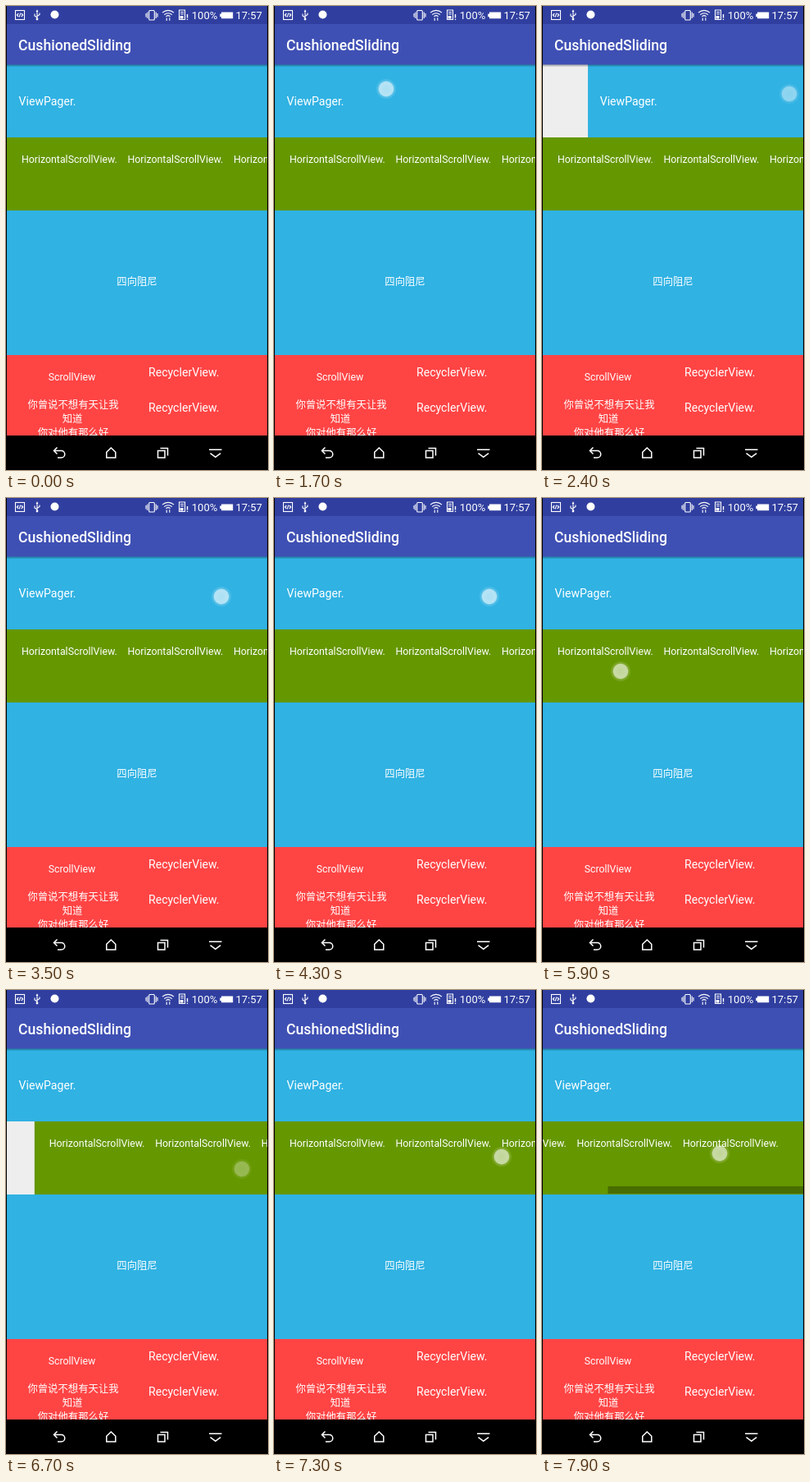
These frames come from a looping animation (320 px wide and 565 px high, 8000 ms). An HTML page:

```html
<!DOCTYPE html>
<html lang="zh">
<head>
<meta charset="utf-8">
<title>CushionedSliding</title>
<style>
  html, body { margin: 0; width: 100%; height: 100%; overflow: hidden; background: #000; }
  #stage { display: block; width: 100%; height: 100%; }
  text { fill: #fff; font: 12.36px Roboto, "Noto Sans CJK SC", "Noto Sans CJK", sans-serif; }
  .title { font-size: 17.66px; font-weight: 500; }
  .big { font-size: 14.1px; }
  .bar { font-size: 13px; }
  .mid { text-anchor: middle; }
  .line { fill: none; stroke: #fff; stroke-width: 1.5; }
  .thin { fill: none; stroke: #fff; stroke-width: 1.1; }
  .solid { fill: #fff; }
</style>
</head>
<body>
<svg id="stage" viewBox="0 0 320 565">
  <defs>
    <linearGradient id="shade" x2="0" y2="1">
      <stop offset="0" stop-color="#000" stop-opacity=".32"/>
      <stop offset="1" stop-color="#000" stop-opacity="0"/>
    </linearGradient>
    <radialGradient id="glow">
      <stop offset="0" stop-color="#fff" stop-opacity=".6"/>
      <stop offset=".7" stop-color="#fff" stop-opacity=".64"/>
      <stop offset=".8" stop-color="#fff" stop-opacity=".18"/>
      <stop offset="1" stop-color="#fff" stop-opacity=".07"/>
    </radialGradient>
  </defs>

  <rect width="320" height="565"/>
  <rect x="1" y="71" width="318" height="452" fill="#eee"/>

  <svg x="1" y="71" width="318" height="89">
    <g id="pager"><rect width="954" height="89" fill="#30b2e3"/></g>
  </svg>

  <svg x="1" y="160" width="318" height="89">
    <g id="row"><rect width="424" height="89" fill="#659700"/></g>
    <rect id="thumb" y="79" width="239" height="9" fill="#000" fill-opacity=".28"/>
  </svg>

  <rect x="1" y="249" width="318" height="176" fill="#30b2e3"/>
  <text class="mid" x="160" y="340">四向阻尼</text>

  <svg x="1" y="425" width="318" height="98">
    <rect width="318" height="98" fill="#ff4444"/>
    <g class="mid">
      <text x="79.5" y="30.5">ScrollView</text>
      <text x="81" y="65">你曾说不想有天让我</text>
      <text x="80" y="82">知道</text>
      <text x="81" y="99">你对他有那么好</text>
    </g>
    <text class="big" x="173" y="26">RecyclerView.</text>
    <text class="big" x="173" y="68.5">RecyclerView.</text>
  </svg>

  <rect x="1" y="22" width="318" height="49.5" fill="#3f50b4"/>
  <rect x="1" y="71.5" width="318" height="3" fill="url(#shade)"/>
  <rect x="1" width="318" height="22" fill="#303f9f"/>
  <text class="title" x="15" y="53.5">CushionedSliding</text>

  <!-- status icons -->
  <g class="thin">
    <rect x="11.5" y="5.5" width="11" height="11"/>
    <path d="M15.3 9l-2 2 2 2M18.7 9l2 2-2 2M17.7 8.7l-1.4 4.6"/>
    <path d="M38 6v10M38 14l-3-2V9.5M38 12.5l3-2V8.5"/>
    <rect x="174.7" y="5.5" width="6.6" height="11.5" rx="1"/>
    <path d="M172.8 7.5v7.5M183.2 7.5v7.5M171 9v4.5M185 9v4.5"/>
    <path d="M191 8.2a10 10 0 0 1 14 0M193.2 10.6a7 7 0 0 1 9.6 0M195.4 12.8a4 4 0 0 1 5.2 0"/>
    <path d="M196.2 14.5v3.5M199.8 14.3v3.5"/>
    <path d="M211.5 5h7v11.5h-7zM213 7.5h4M213 9.8h4"/>
  </g>
  <g class="solid">
    <circle cx="59.5" cy="10.5" r="5"/>
    <path d="M36.5 7L38 4.2 39.5 7z"/>
    <circle cx="38" cy="16" r="1.4"/>
    <rect x="212.5" y="12" width="4" height="3.5"/>
    <path d="M220.8 10h1.4v4.5h-1.4zM220.8 15.7h1.4v1.4h-1.4z"/>
    <path d="M261.3 9.5h1.7V7.5h14.2v7.8H263v-2h-1.7z"/>
  </g>
  <text class="bar" x="226.8" y="16">100%</text>
  <text class="bar" x="280.5" y="16">17:57</text>

  <!-- navigation icons -->
  <g class="line">
    <path d="M62.5 537.5l-4 4 4 4M58.8 541.5h8.7a4.3 4.3 0 0 1 0 8.6h-4.5"/>
    <path d="M122.8 543.3l5.5-5.3 5.5 5.3v6.7h-11z"/>
    <path d="M185.5 541.5h8.5v8.5h-8.5zM188.5 538.6h9v9"/>
    <path d="M248 540.2h15.5M249.5 544.6l6.3 4.8 6.3-4.8"/>
  </g>

  <g id="finger">
    <circle r="12.3" fill="url(#glow)"/>
    <circle r="6" fill="none" stroke="#fff" stroke-opacity=".2" stroke-dasharray="1 1.5"/>
  </g>
</svg>
<script>
const LOOP = 8000, STEP = 100, PAGE = 318, ROW_MAX = 106, DAMPING = 0.51;
const $ = id => document.getElementById(id);

// Without a scroll distance, a swipe stretches the panel past its edge.
const swipes = [
  { panel: "pager", at: 1700, hold: 500, x: 137, y: 101, dx: 165 },
  { panel: "pager", at: 3500, hold: 200, x: 263, y: 120, dx: -150, scroll: PAGE },
  { panel: "pager", at: 4300, hold: 150, x: 263, y: 120, dx: -150, scroll: PAGE },
  { panel: "pager", at: 4700, hold: 250, x: 263, y: 120, dx: -150 },
  { panel: "row", at: 5900, hold: 500, x: 96, y: 211, dx: 192 },
  { panel: "row", at: 7300, hold: 200, x: 278, y: 203, dx: -150, scroll: ROW_MAX },
  { panel: "row", at: 7900, hold: 500, x: 217, y: 199, dx: -150 }
];

const clamp = p => Math.min(1, Math.max(0, p));
const ramp = (t, from, length) => (1 - Math.cos(Math.PI * clamp((t - from) / length))) / 2;

const drag = (s, t) => s.dx * ramp(t, s.at, s.hold * 0.8);

function shift(s, t) {
  if (s.scroll) return -s.scroll * ramp(t, s.at, s.hold * 2);
  return DAMPING * drag(s, t) * (1 - ramp(t, s.at + s.hold, s.hold));
}

const offset = (panel, t) =>
  swipes.filter(s => s.panel === panel).reduce((sum, s) => sum + shift(s, t), 0);

function addLabel(parent, text, x, y, cls) {
  const el = document.createElementNS("http://www.w3.org/2000/svg", "text");
  el.setAttribute("x", x);
  el.setAttribute("y", y);
  if (cls) el.setAttribute("class", cls);
  el.textContent = text;
  parent.append(el);
}

for (let i = 0; i < 3; i++) {
  addLabel($("pager"), "ViewPager.", 14.6 + i * PAGE, 50, "big");
  addLabel($("row"), "HorizontalScrollView.", 17.9 + i * 129.5, 31);
}

const move = (id, x, y = 0) => $(id).setAttribute("transform", `translate(${x} ${y})`);
const fade = (id, alpha) => $(id).setAttribute("opacity", alpha);

function draw(now) {
  const t = Math.floor(now % LOOP / STEP) * STEP;
  const row = offset("row", t);
  move("pager", offset("pager", t));
  move("row", row);
  move("thumb", -row * PAGE / (PAGE + ROW_MAX));
  fade("thumb", row < 0 ? 1 : 0);

  const s = swipes.find(s => t >= s.at && t < s.at + s.hold * 2);
  if (s) move("finger", s.x + drag(s, t), s.y + drag(s, t) * 0.036);
  fade("finger", s ? 1 - clamp((t - s.at - s.hold) / s.hold) ** 1.4 : 0);
}

const start = performance.now();
function tick() {
  draw(performance.now() - start);
  requestAnimationFrame(tick);
}
tick();
</script>
</body>
</html>
```
